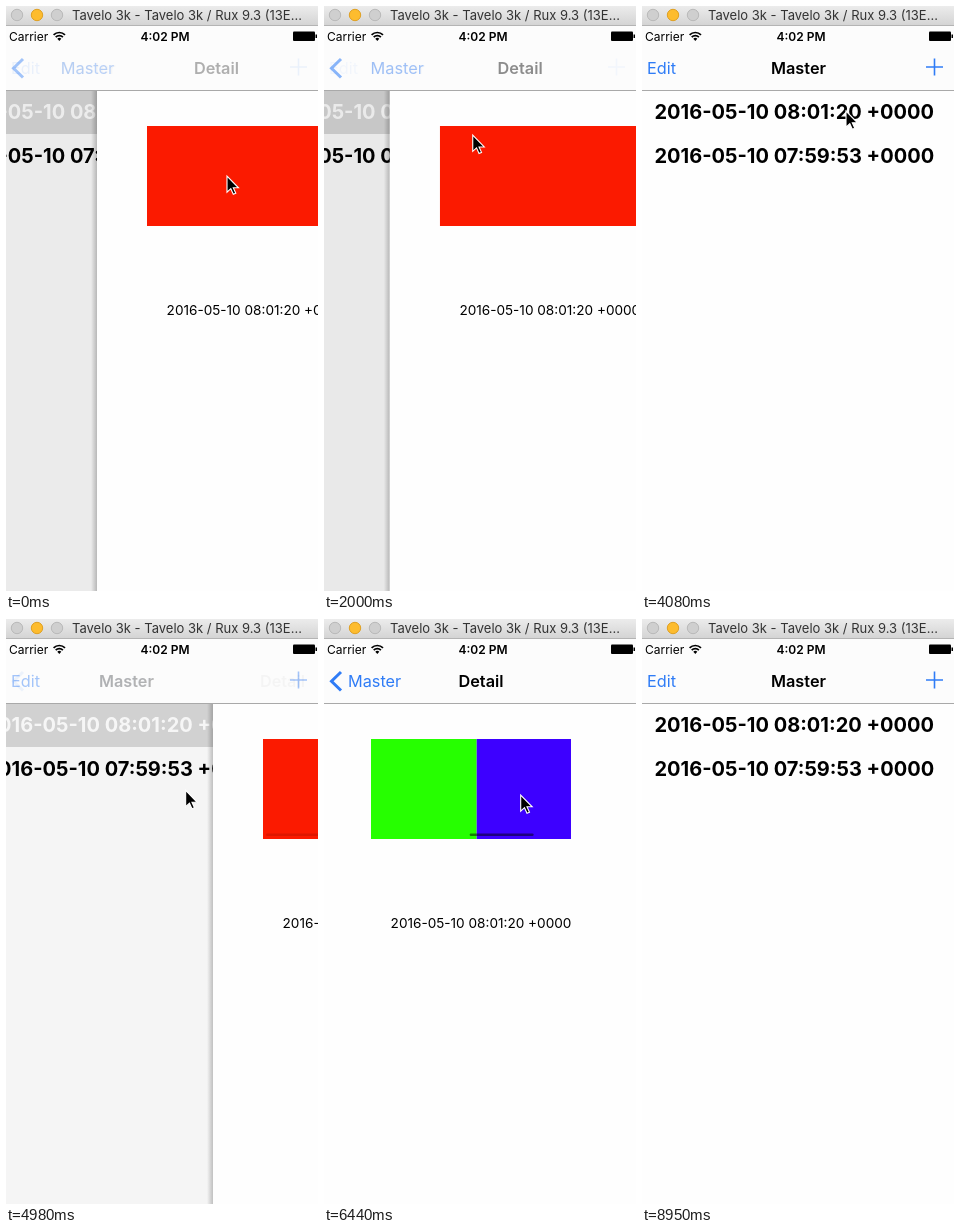
An HTML page that plays this animation: 312 by 585 pixels, repeating every 9.09 s.

```html
<!DOCTYPE html>
<html lang="en">
<head>
<meta charset="utf-8">
<title>Swipe back demo</title>
<style>
  html, body { margin: 0; width: 100%; height: 100%; overflow: hidden; background: #fefefe; }
  svg { display: block; width: 312px; height: 585px; font-family: Inter, Roboto, sans-serif; }
  .nav { font-size: 16.3px; }
  .bold { font-weight: 600; }
  .blue { fill: #2f7cf6; }
  .line { fill: none; stroke: #2f7cf6; }
  .row { font-size: 20px; font-weight: 700; }
</style>
</head>
<body>
<svg viewBox="0 0 312 585">
  <defs>
    <linearGradient id="chrome" x2="0" y2="1">
      <stop stop-color="#ececec"/><stop offset="1" stop-color="#d3d3d3"/>
    </linearGradient>
    <linearGradient id="shade">
      <stop stop-opacity="0"/><stop offset="1" stop-opacity=".22"/>
    </linearGradient>
    <clipPath id="window"><rect x="47" y="120" width="200" height="100"/></clipPath>
  </defs>

  <g id="master">
    <rect id="selection" x="-3" y="85" width="320" height="43" fill="#d9d9d9"/>
    <text id="firstRow" class="row" x="12.5" y="113">2016-05-10 08:01:20 +0000</text>
    <text class="row" x="12.5" y="157">2016-05-10 07:59:53 +0000</text>
  </g>
  <rect id="dim" y="84" width="312" height="501"/>

  <g id="detail">
    <rect id="shadow" x="-9" y="84" width="6" height="501" fill="url(#shade)"/>
    <rect x="-3" y="84" width="320" height="501" fill="#fefefe"/>
    <g clip-path="url(#window)">
      <g id="pages">
        <rect x="47" y="120" width="200" height="100" fill="#fb1a00"/>
        <rect x="247" y="120" width="200" height="100" fill="#26ff00"/>
        <rect x="447" y="120" width="200" height="100" fill="#3d00ff"/>
      </g>
    </g>
    <rect id="scroller" y="214.5" height="2.5" rx="1.25"/>
    <text x="157" y="309" font-size="13.6" text-anchor="middle">2016-05-10 08:01:20 +0000</text>
  </g>

  <rect y="20" width="312" height="64" fill="#fcfcfc"/>
  <rect y="84" width="312" height="1" fill="#a9a9a9"/>
  <g class="nav">
    <g id="rootItems">
      <text class="blue" x="5" y="68">Edit</text>
      <path class="line" stroke-width="1.6" d="M284 61h17M292.5 52.5v17"/>
    </g>
    <path id="chevron" class="line" stroke-width="3" d="M17 53L7.5 62.2 17 71.5"/>
    <text id="backLabel" class="blue" y="68">Master</text>
    <text id="rootTitle" class="bold" y="68">Master</text>
    <text id="detailTitle" class="bold" y="68" text-anchor="middle">Detail</text>
  </g>

  <g font-size="12">
    <text x="3" y="34.5">Carrier</text>
    <text class="bold" x="159" y="34.5" text-anchor="middle">4:02 PM</text>
    <path fill="none" stroke="#000" stroke-width="1.7" d="M47.6 28.9a8 8 0 0 1 11.4 0M49.7 31.2a5 5 0 0 1 7.2 0"/>
    <path d="M51.3 32.7a3 3 0 0 1 4 0L53.3 35z"/>
    <rect x="287" y="25.5" width="22" height="9.5" rx="1"/>
    <path d="M309.5 28.5h1.5v3.5h-1.5z"/>
  </g>

  <rect width="312" height="20" fill="url(#chrome)"/>
  <rect y="19" width="312" height="1" fill="#b4b4b4"/>
  <g stroke="#b9b9b9" fill="#cfcfcf">
    <circle cx="11" cy="9" r="5.7"/>
    <circle cx="31" cy="9" r="5.7" fill="#fdbc2e" stroke="#dfa023"/>
    <circle cx="51" cy="9" r="5.7"/>
  </g>
  <text x="66" y="14" font-size="13" fill="#333">Tavelo 3k - Tavelo 3k / Rux 9.3 (13E...</text>

  <path id="cursor" stroke="#fff" stroke-width="1.1" d="M0 0V16.2L3.8 12.7 6.3 18.3 8.8 17.2 6.3 11.8H11.5Z"/>
</svg>
<script>
const LOOP = 9090, WIDTH = 320, PAGE = 200;
const $ = id => document.getElementById(id);
const set = (id, attrs) => {
  for (const name in attrs) $(id).setAttribute(name, attrs[name]);
};
const move = (id, x, y = 0) => set(id, { transform: `translate(${x} ${y})` });

// Eased progress from 0 to 1 between two times.
function ramp(t, from, to) {
  const x = Math.min(1, Math.max(0, (t - from) / (to - from)));
  return x * x * (3 - 2 * x);
}

// A start value plus any number of eased changes [from, to, amount].
const animate = (t, value, ...changes) =>
  changes.reduce((sum, [from, to, amount]) => sum + amount * ramp(t, from, to), value);

const runs = [[0, 380, 2], [678, 147.8, 24], [4826, 147.2, 23], [8508, 146.6, 4]];
function stepTime(t) {
  const [start, length, count] = runs.filter(run => run[0] <= t).pop();
  return start + length * Math.min(count - 1, Math.floor((t - start) / length));
}

const waypoints = [[0, 221, 170], [678, 300, 170], [1269, 181, 164], [1565, 165, 110], [2394, 109, 176],
  [2747, 250, 176], [3000, 300, 176], [4077, 204, 105], [4826, 204, 105], [5000, 178, 176], [7041, 118, 180],
  [7328, 188, 180], [7600, 285, 186], [8064, 196, 197], [8400, 196, 197], [8949, 270, 610]];
const SWIPES = { from: 5000, to: 7041, left: 5709, period: 423 };

function cursorAt(t) {
  if (t > SWIPES.from && t < SWIPES.to) {
    return [153 - 56 * Math.cos(2 * Math.PI * (t - SWIPES.left) / SWIPES.period), 176];
  }
  const next = waypoints.findIndex(point => point[0] > t);
  if (next < 0) return waypoints[waypoints.length - 1].slice(1);
  const [from, x, y] = waypoints[next - 1], [to, x2, y2] = waypoints[next];
  const k = ramp(t, from, to);
  return [x + (x2 - x) * k, y + (y2 - y) * k];
}

function draw(t) {
  const slide = animate(t, 94, [200, 980, WIDTH - 94], [1510, 2010, -WIDTH], [2394, 3160, WIDTH],
    [4780, 5270, -WIDTH], [7041, 7992, WIDTH]);
  const selected = animate(t, 1, [830, 1130, -1], [1500, 1501, 1], [3000, 3350, -1], [4800, 4801, 1], [7750, 8060, -1]);
  const page = animate(t, 0, [4990, 5380, PAGE], [5400, 5773, PAGE], [6080, 6500, -PAGE], [6560, 7000, -PAGE]);
  const overscroll = 43 * Math.sin(Math.PI * ramp(t, 7041, 7992));
  const p = slide / WIDTH, fadeIn = p ** 2, fadeOut = (1 - p) ** 3.4;

  move("master", -0.3 * (WIDTH - slide));
  set("selection", { opacity: selected });
  const shade = Math.round(255 * selected);
  set("firstRow", { fill: `rgb(${shade},${shade},${shade})` });
  set("dim", { width: Math.max(0, slide - 3), opacity: 0.105 * (1 - p) });

  move("detail", slide);
  set("shadow", { opacity: p < 1 ? 1 : 0 });
  move("pages", overscroll - page);
  set("scroller", {
    x: 50 + page * 0.325,
    width: 64 - overscroll,
    opacity: animate(t, 0, [4900, 5130, 0.5], [7700, 7950, -0.5])
  });

  set("rootItems", { opacity: fadeIn });
  set("chevron", { opacity: (1 - p) ** 2.4 });
  set("backLabel", { x: 24 + 105 * p, opacity: fadeOut });
  set("rootTitle", { x: 24 + 105 * p, opacity: p ** 3 });
  set("detailTitle", { x: 157 + 182 * p, opacity: fadeOut });
  move("cursor", ...cursorAt(t));
}

function tick() {
  draw(stepTime(performance.now() % LOOP));
  requestAnimationFrame(tick);
}
tick();
</script>
</body>
</html>
```
